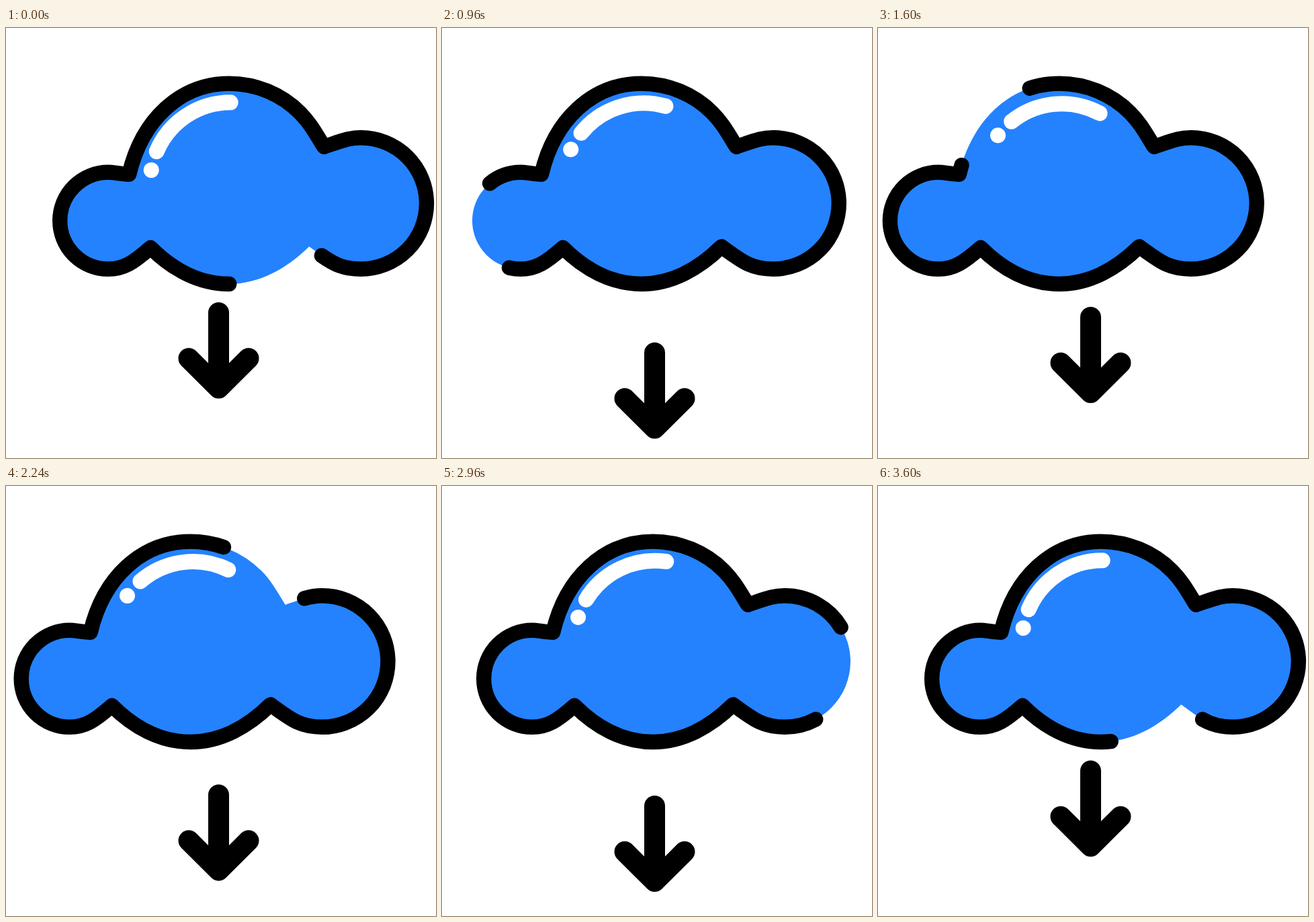
An HTML page for the animation above (3.64 s loop, 640 by 640 pixels).

```html
<!DOCTYPE html>
<html lang="en">
<head>
<meta charset="utf-8">
<title>Cloud download</title>
<style>
  html, body { margin: 0; width: 100%; height: 100%; overflow: hidden; background: #fff; }
  svg { display: block; width: 100vw; height: 100vh; }
  path { fill: none; stroke-linecap: round; stroke-linejoin: round; }
</style>
</head>
<body>
<svg viewBox="0 0 640 640">
  <g id="cloud">
    <path id="body" style="fill:#2482ff"/>
    <g id="shine">
      <path d="M-108-48A119.5 119.5 0 0 1 2-121" stroke="#fff" stroke-width="23"/>
      <circle cx="-116" cy="-20.3" r="11.5" fill="#fff"/>
    </g>
    <path id="line" stroke="#000" stroke-width="22.4"/>
  </g>
  <path id="arrow" d="M316.5 423.7V536M272 491.7L316.5 536L361 491.7" stroke="#000" stroke-width="31"/>
</svg>
<script>
const LOOP = 3640, STEP = 40;
const $ = id => document.getElementById(id);
const cloud = $('cloud'), shine = $('shine'), line = $('line'), arrow = $('arrow');

// Clockwise outline around the middle of the large lobe, from its lowest point
const outline = [
  'M0 149.2 C-45 149.2 -85 127 -117 95',
  'C-142 117 -157 127 -180 127',
  'A72 72 0 0 1 -180 -17',
  'C-172 -17 -165 -15 -149 -14',
  'C-130 -95 -73 -149.2 0 -149.2',
  'A149.2 149.2 0 0 1 105.5 -105.5',
  'C119 -92 127 -78 141 -55',
  'C168 -64 178 -68.5 196 -68.5',
  'A97.75 97.75 0 0 1 196 127',
  'C163 127 150 116 119 93.5',
  'C86 126 45 149.2 0 149.2Z'
].join('');
$('body').setAttribute('d', outline);
line.setAttribute('d', outline);

const length = line.getTotalLength();
const gap = length * 0.11;
line.setAttribute('stroke-dasharray', `${length - gap} ${gap}`);

// Ease along a cubic Bezier with handles (a, 0) and (b, 1)
function ease(a, b) {
  return p => {
    let lo = 0, hi = 1;
    for (let i = 0; i < 24; i++) {
      const s = (lo + hi) / 2, r = 1 - s;
      const x = 3 * r * r * s * a + 3 * r * s * s * b + s * s * s;
      if (x < p) lo = s; else hi = s;
    }
    return lo * lo * (3 - 2 * lo);
  };
}
const smooth = ease(0.45, 0.55);
const quick = ease(0.15, 0.55);

function drop(u) {
  const part = Math.floor(u * 4), p = u * 4 - part;
  if (part % 2) return 1 - smooth(p);
  return part ? quick(p) : smooth(p);
}

function draw(ms) {
  const u = Math.floor((ms % LOOP) / STEP) * STEP / LOOP;
  const sway = smooth(1 - Math.abs(1 - 2 * u));
  cloud.setAttribute('transform', `translate(${332.2 - 64 * sway} 231.8)`);
  shine.setAttribute('transform', `rotate(${29 * sway} -1 2.8)`);
  line.setAttribute('stroke-dashoffset', -length * u);
  arrow.setAttribute('transform', `translate(0 ${60 * drop(u)})`);
}

function tick(now) {
  draw(now);
  requestAnimationFrame(tick);
}
draw(0);
requestAnimationFrame(tick);
</script>
</body>
</html>
```
